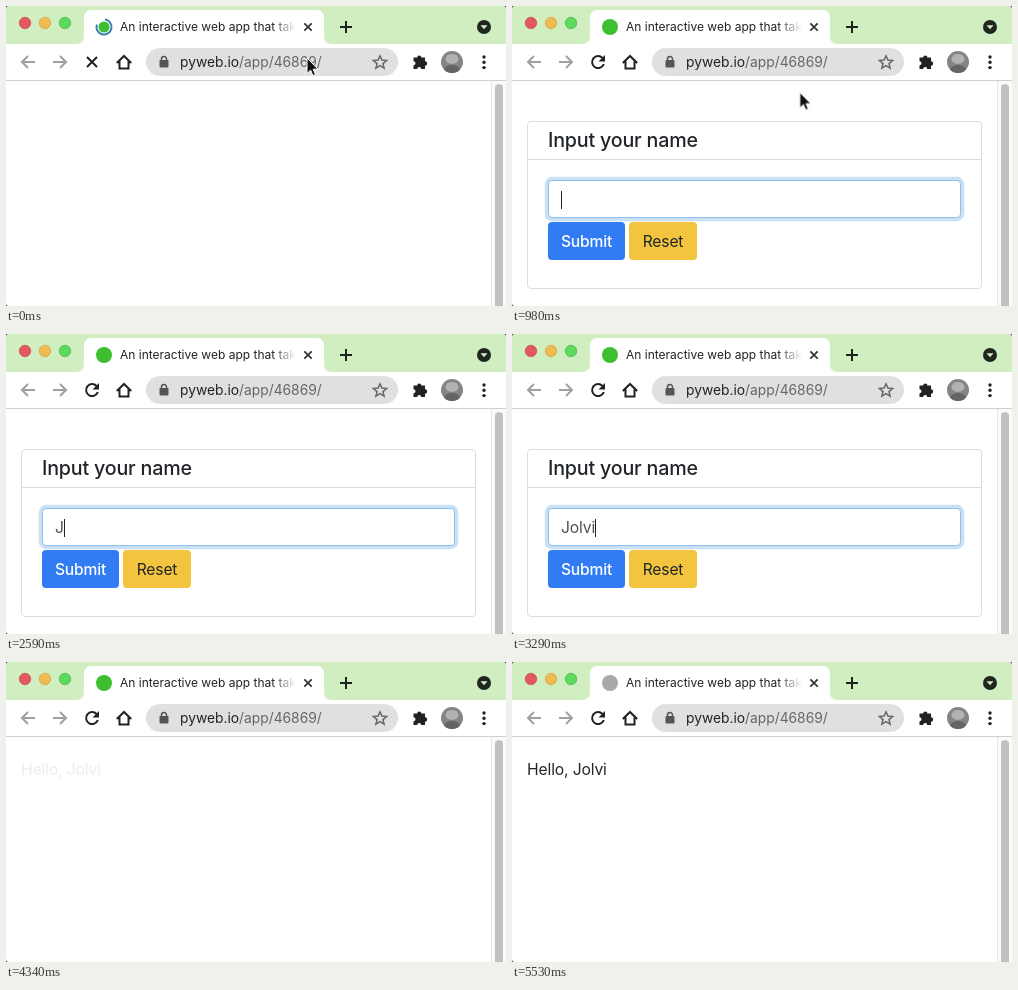
Write an HTML page that moves like this. It is 500 px wide and 300 px high and loops after 5880 ms.

```html
<!DOCTYPE html>
<html lang="en">
<head>
<meta charset="utf-8">
<title>Web app demo</title>
<style>
  html, body { margin: 0; width: 100%; height: 100%; overflow: hidden; background: #fff; }
  .stage { position: relative; width: 500px; height: 300px; overflow: hidden; font-family: Inter, Roboto, sans-serif; color: #212529; }
  .stage > svg { position: absolute; left: 0; top: 0; }
  .line { fill: none; stroke-width: 2; }
  .anim, .key { animation: 5880ms step-end infinite; }

  .form { position: absolute; left: 15px; top: 115px; width: 453px; height: 166px; border: 1px solid #dcdcdc; border-radius: 4px; animation: form 5880ms cubic-bezier(.36, 0, .64, 1) infinite; }
  .form h5 { margin: 0; padding-left: 20px; height: 37px; line-height: 37px; font-size: 19.7px; font-weight: 500; letter-spacing: -.01em; border-bottom: 1px solid #dcdcdc; }
  .input { position: absolute; left: 20px; top: 58px; box-sizing: border-box; width: 413px; height: 38px; padding-left: 12px; border: 1px solid #ced4da; border-radius: 4px; background: #fff; line-height: 38px; font-size: 15.7px; letter-spacing: -.01em; color: #495057; white-space: nowrap; animation: focus 5880ms ease-in-out infinite; }
  .key { font-size: 0; animation-name: type; }
  .caret { display: inline-block; width: 1px; height: 18px; margin-right: -1px; vertical-align: -4px; background: #222; animation-name: blink; }
  .btn { position: absolute; top: 100px; height: 38px; line-height: 40px; border-radius: 4px; text-align: center; font-size: 15.6px; letter-spacing: -.01em; }
  .submit { left: 20px; width: 77px; background: #317cf3; color: #fff; font-weight: 500; }
  .reset { left: 101px; width: 68px; background: #f3c53f; }
  .result { position: absolute; left: 15px; top: 96px; line-height: 24px; font-size: 15.7px; letter-spacing: -.01em; animation: result 5880ms cubic-bezier(.36, 0, .64, 1) infinite; }

  .loading { animation-name: loading; }
  .loaded { animation-name: loaded; }
  .fav { animation-name: fav; }
  .spin { transform-origin: 98px 21px; animation: spin 980ms linear infinite; }
  .mouse { animation: move 5880ms infinite; }
  .arrow { animation-name: arrow; }
  .beam { animation-name: beam; }

  @keyframes form { 0%, 3.57% { opacity: 0; } 10.37%, 70.2% { opacity: 1; } 71.8%, 100% { opacity: 0; } }
  @keyframes result { 0%, 72.6% { opacity: 0; } 79.4%, 100% { opacity: 1; } }
  @keyframes focus {
    0%, 11.56% { border-color: #ced4da; box-shadow: 0 0 0 0 rgba(40, 130, 215, 0); }
    14.1%, 100% { border-color: #8cc0ec; box-shadow: 0 0 0 3.2px rgba(40, 130, 215, .25); }
  }
  @keyframes type { 0% { font-size: 15.7px; } 45%, 100% { font-size: 0; } }
  @keyframes blink {
    0%, 28.57%, 44.04%, 70.2% { opacity: 1; }
    20.07%, 36.9%, 61.9% { opacity: 0; }
    100% { opacity: 1; }
  }
  @keyframes loading { 0% { visibility: visible; } 4.76%, 100% { visibility: hidden; } }
  @keyframes loaded { 0% { visibility: hidden; } 4.76%, 100% { visibility: visible; } }
  @keyframes fav { 0% { fill: #3dbf30; } 90.47%, 100% { fill: #a9a9a9; } }
  @keyframes spin { to { transform: rotate(360deg); } }
  @keyframes move {
    0%, 15.48% { transform: translate(301px, 52px); animation-timing-function: cubic-bezier(.23, .53, .41, .97); }
    26.19%, 100% { transform: translate(249px, 187px); }
  }
  @keyframes arrow { 0% { visibility: visible; } 22.1%, 100% { visibility: hidden; } }
  @keyframes beam { 0% { visibility: hidden; } 22.1% { visibility: visible; } 44.04%, 100% { visibility: hidden; } }
</style>
</head>
<body>
<div class="stage">
  <svg width="500" height="300">
    <defs>
      <linearGradient id="fade" gradientUnits="userSpaceOnUse" x1="266" x2="290" y1="0" y2="0">
        <stop offset="0" stop-color="#fff" stop-opacity="0"/>
        <stop offset="1" stop-color="#fff"/>
      </linearGradient>
      <clipPath id="face"><circle cx="446" cy="56" r="11"/></clipPath>
    </defs>

    <!-- tab strip -->
    <rect width="500" height="38" fill="#d1eec1"/>
    <path d="M70 38q8 0 8-8V12q0-8 8-8H310q8 0 8 8V30q0 8 8 8z" fill="#fff"/>
    <g stroke-width=".8">
      <circle cx="19" cy="17" r="5.7" fill="#e2585c" stroke="#cb4c50"/>
      <circle cx="39" cy="17" r="5.7" fill="#f0bb50" stroke="#d6a442"/>
      <circle cx="59" cy="17" r="5.7" fill="#5cda5c" stroke="#4bbb4a"/>
    </g>
    <g class="anim loading">
      <circle cx="98" cy="21" r="5.5" fill="#3dbf30"/>
      <path class="line spin" d="M99 13.6A7.5 7.5 0 1 1 90.9 18.6" stroke="#3c7fb5"/>
    </g>
    <g class="anim loaded"><circle class="anim fav" cx="98" cy="21" r="8"/></g>
    <text x="114" y="25" font-size="12" fill="#222">An interactive web app that tak</text>
    <rect x="264" y="10" width="34" height="22" fill="url(#fade)"/>
    <path class="line" d="M298.300 17.300l7.400 7.400m0-7.400l-7.400 7.400" stroke="#333" style="stroke-width:1.7"/>
    <path class="line" d="M334 21h12M340 15v12" stroke="#222"/>
    <circle cx="478" cy="21" r="7" fill="#20261f"/>
    <path d="M474.500 19.300h7l-3.500 4z" fill="#d1eec1"/>

    <!-- toolbar -->
    <path d="M0 74.500H500" stroke="#cfcfcf"/>
    <g class="line" stroke="#a0a0a0">
      <path d="M29 56H16M22 50l-6 6 6 6"/>
      <path d="M47 56H60M54 50l6 6-6 6"/>
    </g>
    <path class="line anim loading" d="M81 51l10 10m0-10l-10 10" stroke="#222"/>
    <g class="anim loaded">
      <path class="line" d="M90.500 52A6 6 0 1 0 91.800 58" stroke="#222"/>
      <path d="M93 49v6.500h-6.500z" fill="#222"/>
    </g>
    <path class="line" d="M110.800 57L118 50l7.200 7M113.500 55v7.500h9V55" stroke="#222"/>
    <rect x="140" y="42" width="252" height="28" rx="14" fill="#e0e0e0"/>
    <rect x="153.500" y="54" width="9" height="7.500" rx="1" fill="#555"/>
    <path class="line" d="M155.500 54.500v-1.500a2.500 2.500 0 0 1 5 0v1.500" stroke="#555" style="stroke-width:1.500"/>
    <text x="174" y="61" font-size="13.8" fill="#666"><tspan fill="#222">pyweb.io</tspan>/app/46869/</text>
    <path class="line" d="M374 49.800l1.900 4.300 4.700.4-3.600 3.100 1.100 4.600-4.100-2.500-4.100 2.500 1.100-4.600-3.600-3.100 4.700-.4z" stroke="#666" style="stroke-width:1.500"/>
    <path d="M407.500 51.500h3.700a2.100 2.100 0 1 1 4.200 0h3.600v3.800a2.200 2.200 0 1 1 0 4.400v3.300h-3.800a2 2 0 1 0-4 0h-3.700v-3.700a2 2 0 1 0 0-4z" fill="#222"/>
    <g clip-path="url(#face)">
      <rect x="435" y="45" width="22" height="22" fill="#858585"/>
      <ellipse cx="446" cy="53" rx="6.500" ry="5" fill="#b3b1b1"/>
      <path d="M437 67q1-8 9-8t9 8z" fill="#646464"/>
    </g>
    <g fill="#222">
      <circle cx="478" cy="51" r="1.700"/><circle cx="478" cy="56.300" r="1.700"/><circle cx="478" cy="61.600" r="1.700"/>
    </g>

    <!-- scrollbar -->
    <rect x="485" y="75" width="15" height="225" fill="#fafafa"/>
    <path d="M485.500 75V300" stroke="#e6e6e6"/>
    <rect x="489" y="78" width="8" height="230" rx="4" fill="#c1c1c1"/>
  </svg>

  <div class="form">
    <h5>Input your name</h5>
    <div class="input"><span class="key" style="animation-delay:2590ms">J</span><span class="key" style="animation-delay:2800ms">o</span><span class="key" style="animation-delay:2940ms">l</span><span class="key" style="animation-delay:3010ms">v</span><span class="key" style="animation-delay:3150ms">i</span><span class="caret anim"></span></div>
    <div class="btn submit">Submit</div>
    <div class="btn reset">Reset</div>
  </div>
  <div class="result">Hello, Jolvi</div>

  <svg width="500" height="300">
    <path d="M0 0H3Q0 0 0 3zM500 0h-3q3 0 3 3zM0 300v-3q0 3 3 3z" fill="#555"/>
    <g class="mouse">
      <path class="anim arrow" d="M0 0V15.500L3.600 12.200 5.900 17.600 8.500 16.500 6.200 11.200H11z" fill="#111" stroke="#fff"/>
      <g class="anim beam" fill="none">
        <path d="M-3.500-7.500Q0-7.500 0-5V5Q0 7.500-3.500 7.500M3.500-7.500Q0-7.500 0-5M0 5Q0 7.500 3.500 7.500M-2 1.500H2" stroke="#333" stroke-width="1.300"/>
      </g>
    </g>
  </svg>
</div>
</body>
</html>
```
